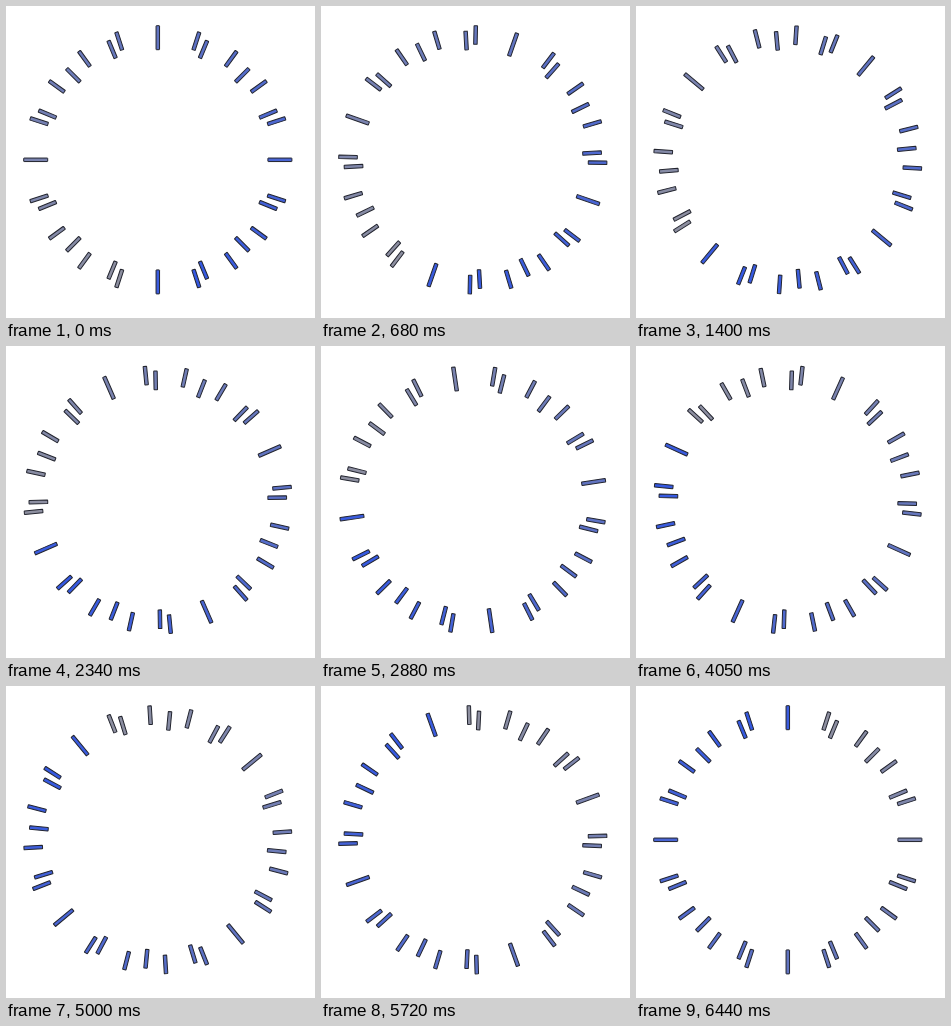
An HTML page that plays this animation: 309x312 px, repeating every 6490 ms.

```html
<!DOCTYPE html>
<html lang="en">
<head>
<meta charset="utf-8">
<title>Turning dial</title>
<style>
  html, body { margin: 0; width: 100%; height: 100%; overflow: hidden; background: #fff; }
  svg { display: block; }
</style>
</head>
<body>
<svg width="309" height="312" viewBox="0 0 309 312"><g id="dial"></g></svg>
<script>
const LOOP = 6490, LAST = 143;
const CX = 151.8, CY = 153.8;
const GREY = [146, 146, 156], BLUE = [48, 86, 230];
const dial = document.getElementById("dial");

// Grey just past the bottom, turning blue clockwise around the ring
function shade(deg) {
  const f = deg === 180 ? 0.9 : ((deg + 180) % 360) / 360;
  return `rgb(${GREY.map((g, i) => Math.round(g + (BLUE[i] - g) * f))})`;
}

function addTick(deg, inner, outer) {
  const tick = document.createElementNS("http://www.w3.org/2000/svg", "rect");
  const attrs = {
    x: -1.75, y: -outer + 0.5, width: 3.5, height: outer - inner - 1, rx: 0.4,
    fill: shade(deg), stroke: "#23252f", "stroke-width": 1,
    transform: `rotate(${deg})`
  };
  for (const key in attrs) tick.setAttribute(key, attrs[key]);
  dial.append(tick);
}

// Two rings of ticks; they coincide at the quarter points
function addRing(count, inner, outer) {
  for (let i = 0; i < count; i++) {
    const deg = i * 360 / count;
    if (deg % 90) addTick(deg, inner, outer);
  }
}

addRing(16, 109.6, 129.3);
addRing(20, 115, 134.6);
for (const deg of [0, 90, 180, 270]) addTick(deg, 109.6, 134.6);

// Steps last 50 and 40 ms in turn
function stepAt(t) {
  const pair = Math.floor(t / 90);
  return Math.min(LAST, pair * 2 + (t - pair * 90 >= 50 ? 1 : 0));
}

// Half a turn per loop with a slight ease-out
function draw(t) {
  const p = stepAt(t) / LAST;
  const angle = 180 * (p + 0.024 * p * (1 - p));
  dial.setAttribute("transform", `translate(${CX} ${CY}) rotate(${angle})`);
}

const start = performance.now();
function tick(now) {
  draw(Math.max(0, now - start) % LOOP);
  requestAnimationFrame(tick);
}
draw(0);
requestAnimationFrame(tick);
</script>
</body>
</html>
```
